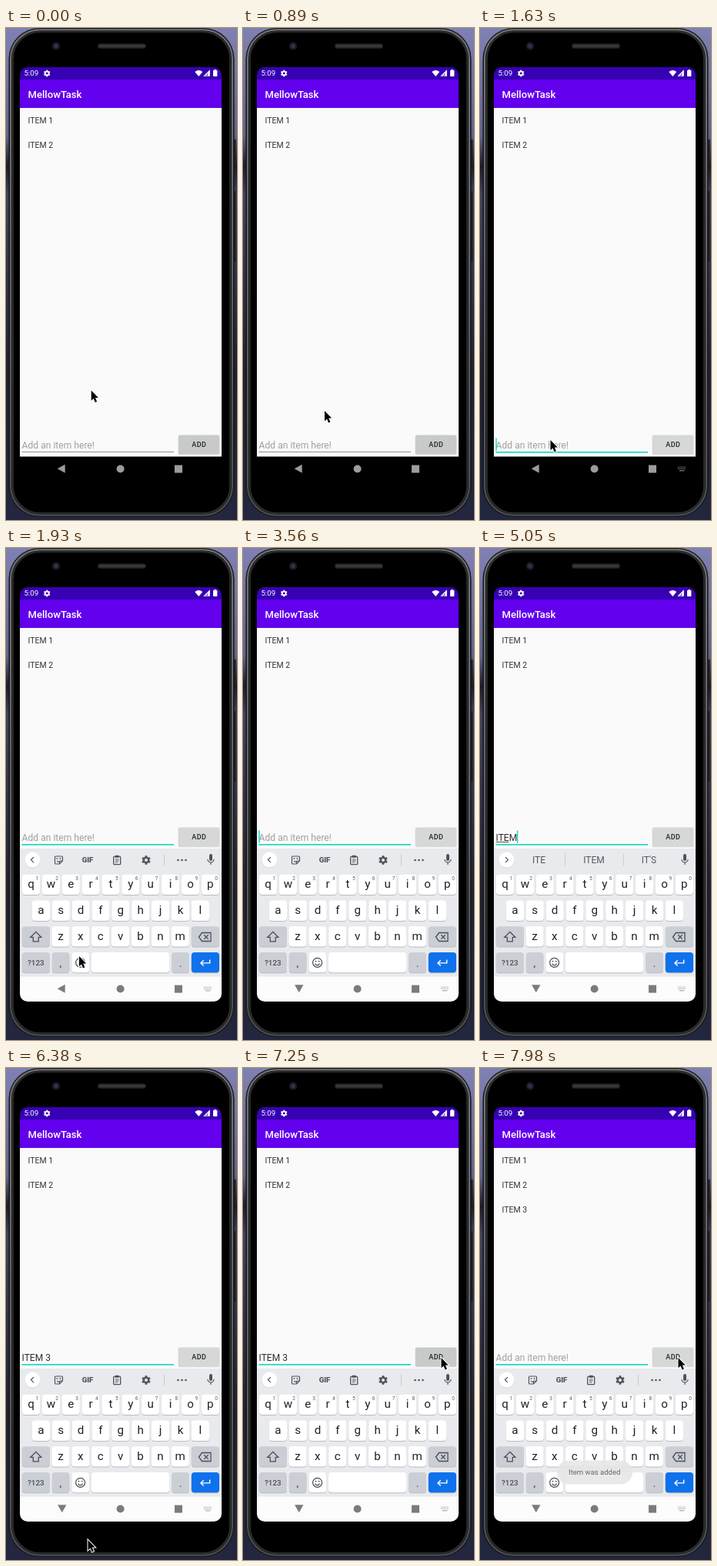
These frames come from a looping animation (300 px wide and 640 px high, 8 s). An HTML page with a canvas:

```html
<!DOCTYPE html>
<html lang="en">
<head>
<meta charset="utf-8">
<title>To-do app demo</title>
<style>
  html, body { margin: 0; width: 100%; height: 100%; overflow: hidden; background: #000; }
  canvas { display: block; width: 300px; height: 640px; }
</style>
</head>
<body>
<canvas id="stage"></canvas>
<script>
const W = 300, H = 640, LOOP = 8000, TICK = 147.75;
const canvas = document.getElementById('stage');
const g = canvas.getContext('2d');
const dpr = window.devicePixelRatio || 1;
canvas.width = W * dpr;
canvas.height = H * dpr;

const FOCUS = 10, KEYS_UP = 12, BACK_DOWN = 14, CLEAR = 50;
const pointerPath = [
  [0, 110.7, 471.5], [1, 113, 466], [2, 112.5, 465], [3, 112.5, 465], [5, 112, 482],
  [8, 94, 530], [9, 91.5, 536], [11, 91.5, 536], [13, 95, 531], [14, 96, 538],
  [15, 100, 575], [16, 105, 610], [17, 106.5, 616], [40, 106.5, 616], [41, 106.5, 614],
  [43, 106.5, 614], [44, 125, 588], [46, 214, 440], [47, 250, 386], [48, 257.5, 377], [54, 257.5, 377]
];
const typed = [[0, ''], [27, 'I'], [28, 'IT'], [29, 'ITE'], [34, 'ITEM'], [36, 'ITEM '], [39, 'ITEM 3'], [CLEAR, '']];
const underlined = [[0, ''], [28, 'I'], [29, 'IT'], [31, 'ITE'], [35, 'ITEM'], [36, '']];
const caretOn = [[0, 0], [FOCUS, 1], [13, 0], [16, 1], [20, 0], [24, 1], [41, 0], [45, 1], [48, 0], [50, 1], [54, 0]];
const hints = [
  [0, null], [28, ['I', 'IT', "I'M"]], [29, ['IT', "IT'S", 'ITS']], [31, ['ITE', 'ITEM', "IT'S"]],
  [35, ['ITEM', 'ITEMS', 'ITEMIZED']], [36, ['IS', 'NUMBER', 'ITEMIZED']], [41, null]
];
const capsOn = [[0, 0], [26, 1], [29, 0]];
const toastAlpha = [[0, 0], [53, 0.3], [54, 0.85]];
const newItemAlpha = [[0, 0], [50, 0.4], [51, 1]];

const at = (list, n) => list.reduce((v, e) => e[0] <= n ? e[1] : v, list[0][1]);

function pointerAt(n) {
  if (n > 17 && n < 41) return null;
  const i = Math.max(1, pointerPath.findIndex(p => p[0] >= n));
  const [a, x0, y0] = pointerPath[i - 1], [b, x1, y1] = pointerPath[i];
  const k = (n - a) / (b - a);
  return [x0 + (x1 - x0) * k, y0 + (y1 - y0) * k];
}

function font(size, weight = 400) { g.font = `${weight} ${size}px Roboto, sans-serif`; }

function text(s, x, y, size, color, align = 'left', weight = 400) {
  font(size, weight);
  g.textAlign = align;
  g.fillStyle = color;
  g.fillText(s, x, y);
}

function rect(x, y, w, h, color) {
  g.fillStyle = color;
  g.fillRect(x, y, w, h);
}

function round(x, y, w, h, r, color) {
  g.beginPath();
  g.roundRect(x, y, w, h, r);
  g.fillStyle = color;
  g.fill();
}

function ring(x, y, w, h, r, color, width = 1) {
  g.beginPath();
  g.roundRect(x, y, w, h, r);
  g.strokeStyle = color;
  g.lineWidth = width;
  g.stroke();
}

function disc(x, y, r, color) {
  g.beginPath();
  g.arc(x, y, r, 0, 7);
  g.fillStyle = color;
  g.fill();
}

function trace(d, x, y) {
  const p = new Path2D();
  p.addPath(new Path2D(d), new DOMMatrix([1, 0, 0, 1, x, y]));
  return p;
}

function shape(d, x, y, color) {
  g.fillStyle = color;
  g.fill(trace(d, x, y));
}

function line(d, x, y, color, width = 1.2) {
  g.strokeStyle = color;
  g.lineWidth = width;
  g.stroke(trace(d, x, y));
}

function gear(x, y, r, color, hole) {
  for (let i = 0; i < 3; i++) {
    g.save();
    g.translate(x, y);
    g.rotate(i * Math.PI / 3);
    rect(-r * 0.24, -r, r * 0.48, r * 2, color);
    g.restore();
  }
  disc(x, y, r * 0.76, color);
  disc(x, y, r * 0.34, hole);
}

function drawPhone() {
  const sky = g.createLinearGradient(0, 0, 0, H);
  [[0, '#7f81b3'], [0.22, '#62638d'], [0.28, '#1b1c28'], [0.34, '#42435f'], [0.48, '#33344c'], [0.7, '#1f2130'], [1, '#22273f']]
    .forEach(([k, c]) => sky.addColorStop(k, c));
  rect(0, 0, W, H, sky);
  round(296, 145, 2.5, 40, 1, '#1e1f24');
  round(296, 212, 2.5, 92, 1, '#1e1f24');

  const rim = g.createLinearGradient(0, 0, 0, H);
  rim.addColorStop(0, '#747577');
  rim.addColorStop(1, '#4c4d4f');
  round(3.5, 0, 293, 636, 40, '#19191a');
  ring(6, 2.2, 288, 631.6, 38, rim, 2);
  ring(8.7, 4.7, 282.6, 626.6, 35.5, '#2d2d2f', 2);
  round(10, 6, 280, 624, 34, '#000');
  round(119, 20, 63, 7, 3.5, '#1b1b1c');
  round(120, 21.5, 61, 4, 2, '#363637');
  disc(65, 23.5, 5, '#1d1e20');
  disc(65, 23.5, 2.5, '#2b3658');
}

function drawBars() {
  rect(18, 51, 262, 16, '#3700b3');
  text('5:09', 23.4, 62, 9.7, '#fff');
  gear(53.2, 59, 4.3, '#fff', '#3700b3');
  shape('M0 2Q5 -2 10 2L5 8Z', 245.3, 55, '#fff');
  shape('M8.5 0V8.5H0Z', 256.3, 54.3, '#fff');
  line('M5.5 4.5V7.5H3', 256.3, 54.3, '#3700b3', 0.8);
  round(269, 55, 5.4, 8, 0.8, '#fff');
  rect(270.4, 54, 2.6, 1.2, '#fff');
  rect(18, 67, 262, 37, '#6200ee');
  text('MellowTask', 28.5, 91, 13.1, '#fff', 'left', 500);
}

function drawList(n) {
  rect(18, 104, 262, 454, '#fafafa');
  for (let i = 0; i < 3; i++) {
    g.globalAlpha = i < 2 ? 1 : at(newItemAlpha, n);
    text('ITEM ' + (i + 1), 28.5, 124 + 32 * i, 10.5, '#333');
  }
  g.globalAlpha = 1;
}

function drawInput(n) {
  const y = n < KEYS_UP ? 547 : 381;
  const value = at(typed, n), mark = at(underlined, n);
  if (value) text(value, 20.6, y, 12, '#2b2b2b');
  else text('Add an item here!', 20.6, y, 12.1, '#a0a0a0');
  const width = s => { font(12); return g.measureText(s).width; };
  if (mark) rect(20.6, y + 1, width(mark), 0.9, '#444');
  if (n < FOCUS) rect(20.5, y + 4, 197.5, 1, '#8f8f8f');
  else rect(20.5, y + 4, 197.5, 1.7, '#1ed8c6');
  if (at(caretOn, n)) rect(20.4 + width(value), y - 13.6, 1.4, 16.5, '#14d6c3');

  const pressed = n < FOCUS || n === 49 || n === 50;
  round(223.5, y - 17, 54, 25.3, 2, 'rgba(0,0,0,.12)');
  round(224, y - 17.6, 53, 24.8, 1.5, pressed ? '#c8c9c9' : '#d6d7d7');
  g.letterSpacing = '0.5px';
  text('ADD', 250.8, y - 2, 9, '#222', 'center', 500);
  g.letterSpacing = '0px';
}

function drawToolbar(n) {
  const ink = '#50545a', words = at(hints, n);
  disc(34.5, 406.2, 10.2, '#d4d6d9');
  disc(34.5, 405.6, 10, '#fff');
  line(words ? 'M-1.5 -3.5L2 0L-1.5 3.5' : 'M1.5 -3.5L-2 0L1.5 3.5', 34.5, 405.6, ink, 1.3);
  shape('M-2 -6a2 2 0 0 1 4 0v5a2 2 0 0 1 -4 0z', 266, 406, ink);
  line('M-4 -1a4 4 0 0 0 8 0M0 3V6', 266, 406, ink, 1.2);
  if (words) {
    words.forEach((w, i) => text(w, 76.5 + i * 71.5, 410, 12, '#54585d', 'center'));
    rect(110, 398, 1, 15, '#cbcdd1');
    rect(186, 398, 1, 15, '#cbcdd1');
    return;
  }
  line('M-5 -4a1 1 0 0 1 1 -1H4a1 1 0 0 1 1 1V1L1 5H-4a1 1 0 0 1 -1 -1ZM5 1H2a1 1 0 0 0 -1 1V5M-2.5 1Q-1 3 1 1.5', 68.5, 406, ink);
  disc(66.5, 404, 0.9, ink);
  disc(70.5, 404, 0.9, ink);
  text('GIF', 106, 409, 9.6, ink, 'center', 900);
  ring(139.7, 401.3, 9, 10.4, 1, ink, 1.3);
  rect(141.7, 399.8, 5, 3, ink);
  line('M-2.3 -1H2.3M-2.3 1H2.3M-2.3 3H1', 144.2, 406, ink, 0.9);
  gear(182, 406, 5.8, ink, '#e8eaed');
  rect(205, 399, 1, 14, '#c9cbcf');
  [223.5, 228.5, 233.5].forEach(x => disc(x, 406, 1.3, ink));
}

function key(x, y, w, color) {
  round(x, y + 1, w, 26.3, 4, '#b9bcc1');
  round(x, y, w, 26.3, 4, color);
}

function drawKeys(n) {
  const grey = '#cbcfd5', ink = '#4a4e54', pitch = 25.87, caps = at(capsOn, n);
  [['qwertyuiop', 32.5, 424.8], ['asdfghjkl', 45.4, 458.6], ['zxcvbnm', 71, 492.2]].forEach(([row, x0, y], r) => {
    [...row].forEach((c, i) => {
      const x = x0 + i * pitch;
      key(x - 11.6, y, 23.2, '#fff');
      text(caps ? c.toUpperCase() : c, x, 442 + 34 * r, 15.2, '#1f2124', 'center');
      if (!r) text((i + 1) % 10, x + 7.8, 432, 6.6, '#5a5d62', 'center');
    });
  });
  key(20.8, 492.2, 36.2, grey);
  const arrow = 'M0 -6.5L7 0.5H3.5V6H-3.5V0.5H-7Z';
  line(arrow, 38.8, 505.8, ink, 1.3);
  if (caps) shape(arrow, 38.8, 505.8, ink);
  key(240.8, 492.2, 36.2, grey);
  line('M-8 0L-4 -5.5H7.5V5.5H-4ZM-1.2 -2.7L4.2 2.7M4.2 -2.7L-1.2 2.7', 258.5, 506, ink, 1.3);

  key(20.8, 526, 36.2, grey);
  text('?123', 38.8, 543, 9.8, ink, 'center', 500);
  key(59.8, 526, 22.6, grey);
  text(',', 71, 545, 14, ink, 'center');
  key(85.4, 526, 22.8, '#fff');
  g.beginPath();
  g.arc(96.6, 539.3, 6, 0, 7);
  g.strokeStyle = ink;
  g.lineWidth = 1.2;
  g.stroke();
  disc(94.5, 537.6, 0.9, ink);
  disc(98.7, 537.6, 0.9, ink);
  line('M-3 0Q0 4.5 3 0', 96.6, 540.6, ink, 1.2);
  key(111, 526, 101, '#fff');
  key(215.2, 526, 22.8, grey);
  text('.', 226.6, 545, 14, ink, 'center');
  key(240.8, 526, 36.2, '#1071ec');
  line('M6 -4V0.3H-5.5M-2 -3.3L-5.7 0.3L-2 3.9', 258.7, 539.6, '#fff', 1.4);
}

function drawKeyboard(n) {
  g.save();
  g.beginPath();
  g.rect(18, 391, 262, 167);
  g.clip();
  if (n === KEYS_UP) g.translate(0, 50);
  rect(18, 391, 262, 167, '#e8eaed');
  drawToolbar(n);
  drawKeys(n);
  g.restore();
}

function drawNav(n) {
  const light = n >= KEYS_UP, ink = light ? '#7b7b7b' : '#9c9c9c';
  rect(18, 557.5, 262, 33, light ? '#fcfcfc' : '#000');
  shape(n < BACK_DOWN ? 'M-5.5 0L4.5 -5.5V5.5Z' : 'M-5.7 -5H5.7L0 5Z', n < BACK_DOWN ? 72.2 : 72.8, 573.3, ink);
  disc(148.6, 573.5, 5, ink);
  rect(219, 568.6, 10, 10, ink);
  if (n >= FOCUS) {
    const dots = light ? '#a8a8a8' : '#858585';
    for (let i = 0; i < 10; i++) rect(257 + (i % 5) * 2.1, 570.6 + (i > 4 ? 2.2 : 0), 1.2, 1.2, dots);
    rect(259, 575.2, 6.4, 1.2, dots);
  }
}

function drawToast(n) {
  g.globalAlpha = at(toastAlpha, n);
  round(99.5, 510.5, 98.5, 31, 15.5, '#e6e6e6');
  text('Item was added', 148.7, 529, 9.5, '#505050', 'center');
  g.globalAlpha = 1;
}

function drawPointer(n) {
  const p = pointerAt(n);
  if (!p) return;
  const d = 'M0 0V13.2L3 10.4L5.1 15.4L7.4 14.4L5.3 9.5H9.2Z';
  line(d, p[0], p[1], '#fff', 2);
  shape(d, p[0], p[1], '#000');
}

function draw(ms) {
  const n = Math.floor((ms % LOOP) / TICK);
  g.setTransform(dpr, 0, 0, dpr, 0, 0);
  drawPhone();
  g.save();
  g.beginPath();
  g.roundRect(18, 51, 262, 539, 10);
  g.clip();
  drawBars();
  drawList(n);
  drawInput(n);
  if (n >= KEYS_UP) drawKeyboard(n);
  drawNav(n);
  drawToast(n);
  g.restore();
  drawPointer(n);
}

const start = performance.now();
function loop() {
  draw(performance.now() - start);
  requestAnimationFrame(loop);
}
loop();
</script>
</body>
</html>
```
